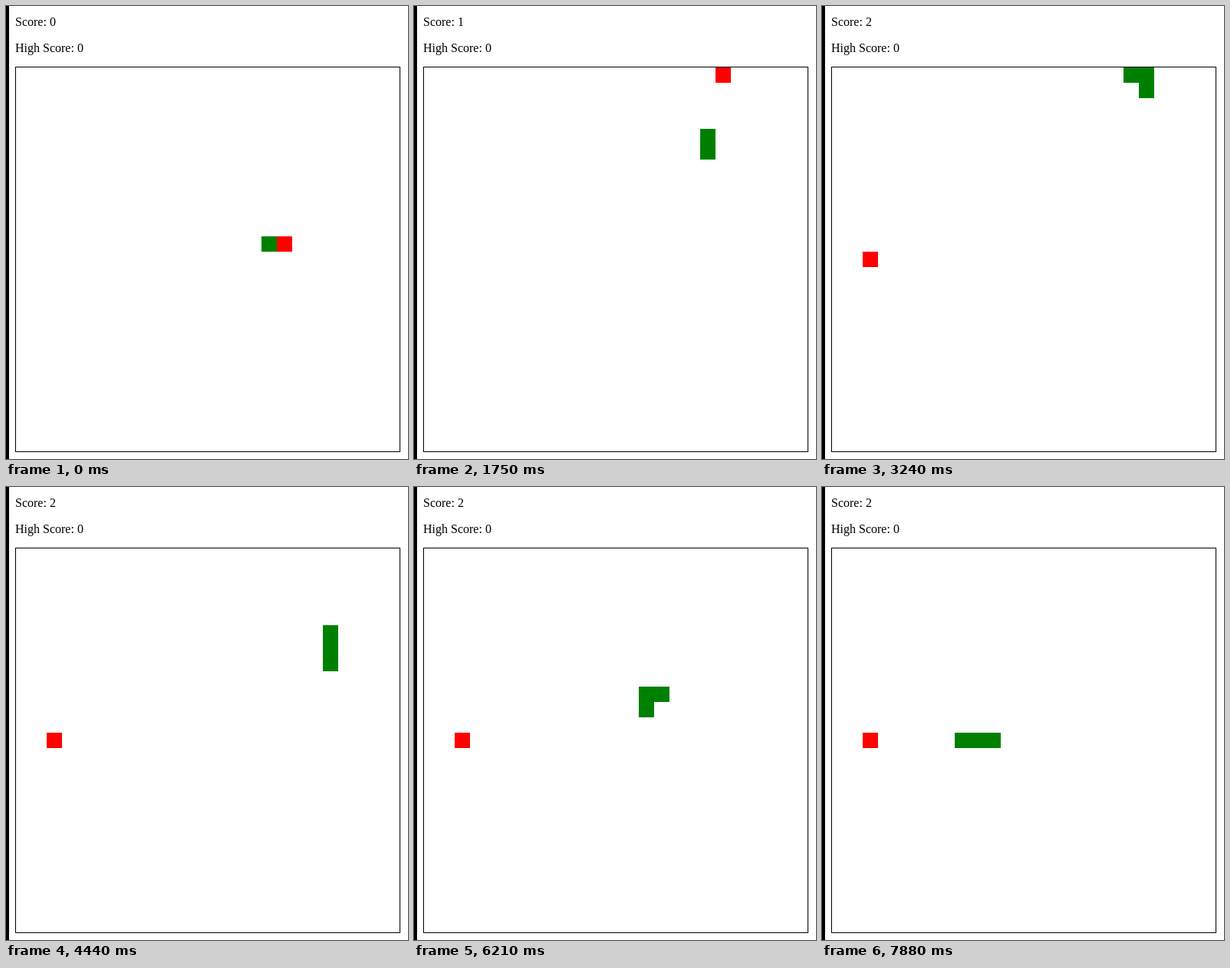
Write an HTML page that moves like this. It is 524x590 px and loops after 8000 ms.

```html
<!DOCTYPE html>
<html lang="en">
<head>
<meta charset="utf-8">
<title>Snake</title>
<style>
  html, body { margin: 0; width: 100%; height: 100%; overflow: hidden; background: #fff; }
  svg { display: block; }
  text { font: 16px "Liberation Serif", "Times New Roman", serif; }
</style>
</head>
<body>
<svg width="524" height="590" viewBox="0 0 524 590">
  <rect width="4" height="590"/>
  <text x="12" y="26">Score: <tspan id="score">0</tspan></text>
  <text x="12" y="60">High Score: 0</text>
  <rect x="12.5" y="79.5" width="501" height="501" fill="none" stroke="#000"/>
  <g transform="translate(13 80)" shape-rendering="crispEdges">
    <path id="snake" fill="green"/>
    <path id="food" fill="red"/>
  </g>
</svg>
<script>
  const LOOP = 8000, CELL = 20;
  // The game ticks steadily; the screen refreshes on a coarser beat (ms)
  const TICK = 201, FIRST_TICK = 152, REFRESH = 127, PHASE = 45;
  const START = [16, 11];
  const FOOD = [[17, 11], [19, 0], [2, 12]];
  const DIRS = { U: [0, -1], D: [0, 1], L: [-1, 0], R: [1, 0] };
  const ROUTE = 'R2 U11 R2 D7 L3 D2 L3 D3 L6';

  const byId = id => document.getElementById(id);
  const score = byId('score'), snake = byId('snake'), food = byId('food');
  const square = ([x, y]) => `M${x * CELL} ${y * CELL}h${CELL}v${CELL}h-${CELL}z`;

  // Play the game once and keep the state after every move
  function play() {
    let body = [START], eaten = 0;
    const states = [{ body, eaten }];
    for (const leg of ROUTE.split(' ')) {
      const [dx, dy] = DIRS[leg[0]];
      for (let n = +leg.slice(1); n > 0; n--) {
        const head = [body[0][0] + dx, body[0][1] + dy];
        if (String(head) === String(FOOD[eaten])) eaten++;
        body = [head, ...body].slice(0, eaten + 1);
        states.push({ body, eaten });
      }
    }
    return states;
  }

  const states = play();

  function stepAt(t) {
    const seen = Math.floor((t + PHASE) / REFRESH) * REFRESH;
    const step = Math.floor((seen - FIRST_TICK) / TICK) + 1;
    return Math.max(0, Math.min(step, states.length - 1));
  }

  function draw() {
    const { body, eaten } = states[stepAt(performance.now() % LOOP)];
    snake.setAttribute('d', body.map(square).join(''));
    food.setAttribute('d', square(FOOD[eaten]));
    score.textContent = eaten;
    requestAnimationFrame(draw);
  }
  draw();
</script>
</body>
</html>
```
